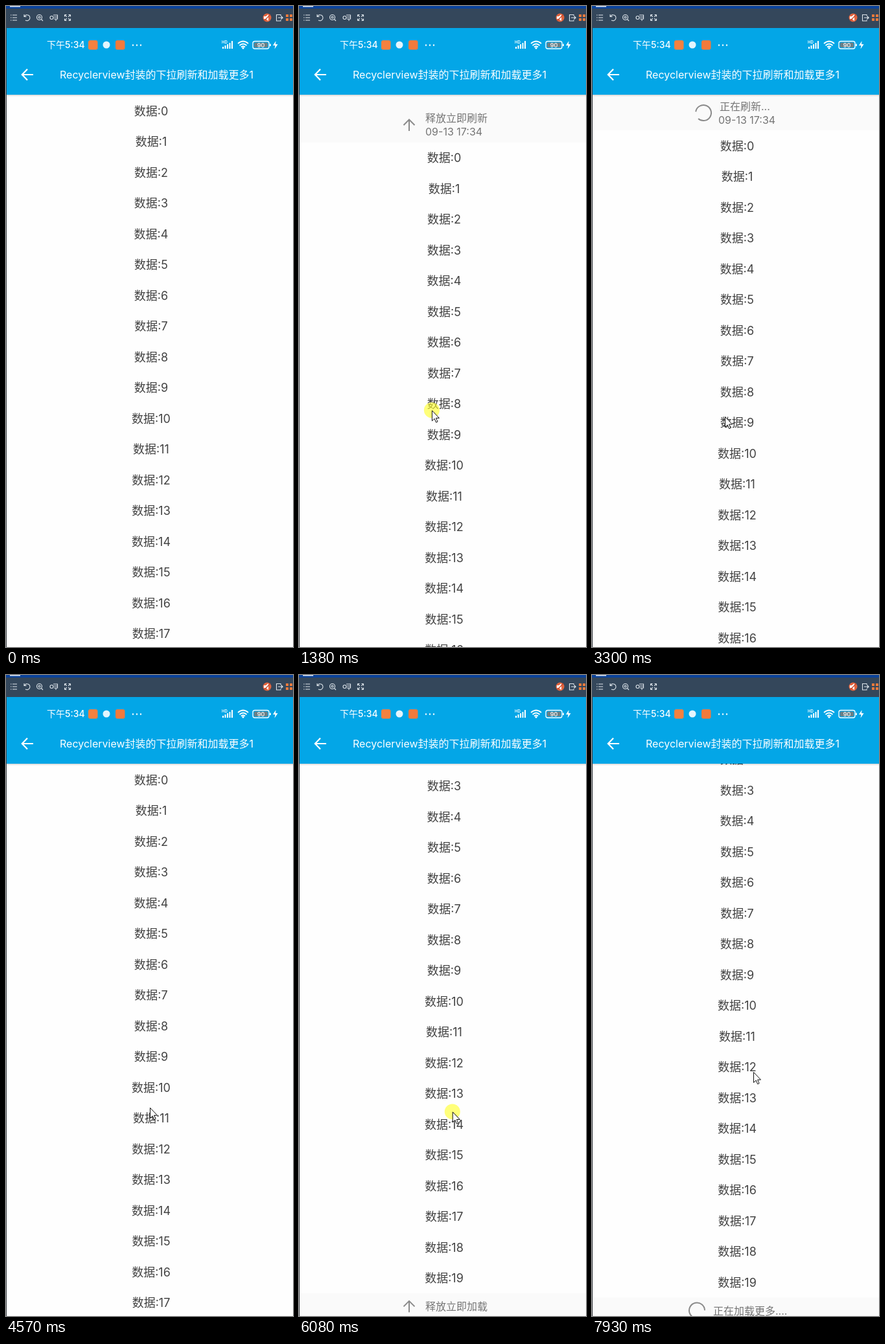
Recreate the animation shown at these times as an HTML page. Size 443 px wide and 990 px high, loop 8 s.

```html
<!DOCTYPE html>
<html lang="zh-CN">
<head>
<meta charset="utf-8">
<title>下拉刷新</title>
<style>
  html, body { margin: 0; width: 100%; height: 100%; overflow: hidden; background: #fafafa; }
  svg { display: block; width: 100vw; height: 100vh; }
  text { font-family: Inter, "Noto Sans CJK SC", "Noto Sans CJK", sans-serif; }
  .row { font-size: 18px; fill: #424242; text-anchor: middle; }
  .hint { font-size: 16px; fill: #757575; }
  .line { fill: none; stroke: #8a8a8a; stroke-width: 2; }
  .tool { fill: none; stroke: #dfe6ec; stroke-width: 1.1; }
  .bar { fill: none; stroke: #fff; }
</style>
</head>
<body>
<svg viewBox="0 0 443 990">
  <defs>
    <linearGradient id="shade" x2="0" y2="1">
      <stop stop-color="#000" stop-opacity=".16"/>
      <stop offset="1" stop-color="#000" stop-opacity="0"/>
    </linearGradient>
    <path id="up" class="line" d="M0 9.5V-8M-8.5 .5L0 -8L8.5 .5"/>
    <path id="ring" class="line" d="M2 11.8A12 12 0 1 1 11 4.8"/>
  </defs>

  <rect width="443" height="990" fill="#fafafa"/>

  <g id="list">
    <rect y="138" width="443" height="950" fill="#fefefe"/>
    <g id="pull">
      <use href="#up" transform="translate(170 111) rotate(180)"/>
      <text class="hint" x="195" y="107">下拉可以刷新</text>
    </g>
    <g id="release">
      <use href="#up" x="170" y="111"/>
      <text class="hint" x="195" y="107">释放立即刷新</text>
    </g>
    <g id="refresh">
      <g transform="translate(172 111)"><use class="spin" href="#ring"/></g>
      <text class="hint" x="197" y="107">正在刷新...</text>
    </g>
    <text id="done" class="hint" x="197" y="107">刷新完成</text>
    <text class="hint" x="195" y="128">09-13 17:34</text>
    <g id="more">
      <use href="#up" x="170" y="1108"/>
      <text class="hint" x="195" y="1114">释放立即加载</text>
    </g>
    <g id="loading">
      <g transform="translate(162 1108)"><use class="spin" href="#ring"/></g>
      <text class="hint" x="187" y="1114">正在加载更多....</text>
    </g>
  </g>

  <circle id="glow" cx="222" cy="1617" r="667" fill="#146e6e" fill-opacity=".13"/>

  <!-- Window toolbar -->
  <rect width="443" height="4" fill="#0b439b"/>
  <rect x="6" width="16" height="1.5" fill="#e4ebf5"/>
  <rect y="4" width="443" height="30" fill="#34475b"/>
  <g class="tool">
    <path stroke-dasharray="1.5 1.5 7 0" d="M7 14H17M7 18H17M7 22H17"/>
    <path d="M28 13V16.5H31.5M28.5 16A4.5 4.5 0 1 1 30 22"/>
    <circle cx="51.5" cy="17.5" r="4"/>
    <circle cx="51.5" cy="17.5" r="1.5"/>
    <path d="M54.5 20.5L57 23"/>
    <circle cx="70.5" cy="18" r="2.5"/>
    <path d="M73 14H79.5V20H74M77 20V23M74 17H79"/>
    <rect x="90.5" y="13.5" width="9" height="9" stroke-dasharray="3 3 3 0"/>
    <path d="M91 14L99 22M99 14L91 22" stroke-dasharray="4 3.3"/>
    <path d="M424 15V13.5H417.5V23H424V21.5M420 18H427L424.5 15.5M427 18L424.5 20.5"/>
  </g>
  <circle cx="403" cy="18" r="6.5" fill="#e2653f"/>
  <path d="M398 16H401L405 13V23L401 20H398Z" fill="#fff"/>
  <path d="M398.5 23L408 13" stroke="#c9472c" stroke-width="1.3"/>
  <path d="M432 15H443M432 21H443" stroke="#ee7b3c" stroke-width="4" stroke-dasharray="4 2"/>

  <!-- App bar -->
  <rect y="34" width="443" height="103" fill="#03a6e7"/>
  <rect y="137" width="443" height="3" fill="url(#shade)"/>
  <g fill="#fff">
    <text x="63" y="65" font-size="14" font-weight="500">下午5:34</text>
    <rect x="127" y="53" width="14.5" height="14.5" rx="3" fill="#f5813f"/>
    <circle cx="155" cy="60" r="5.5" fill="#e3f5fd"/>
    <rect x="169" y="53" width="14.5" height="14.5" rx="3" fill="#f27a3c"/>
    <path class="bar" d="M196 60.5H209" stroke-width="2.4" stroke-linecap="round" stroke-dasharray="0 6"/>
    <text x="333" y="58" font-size="6" font-weight="600">HD</text>
    <path d="M416.5 54L412 61H415.5L414.5 66.5L419.5 59H416Z"/>
    <circle cx="366" cy="65" r="1.6"/>
    <text x="83" y="112" font-size="16">Recyclerview封装的下拉刷新和加载更多1</text>
  </g>
  <path class="bar" stroke-width="2" d="M335 66V63M338.500 66V61M342 66V59M345.500 66V57M349 66V54"/>
  <path class="bar" stroke-width="1.7" d="M358 58Q366 51 374 58M360.5 61Q366 56 371.5 61M363 63.5Q366 61 369 63.5"/>
  <rect class="bar" x="381" y="54.5" width="25" height="11.5" rx="3" stroke-width="1.3"/>
  <rect x="383" y="56.5" width="21" height="7.5" rx="1.5" fill="#6a7f86"/>
  <rect x="407" y="58.5" width="1.8" height="3.5" fill="#fff"/>
  <text x="393.5" y="63.5" font-size="9" font-weight="500" fill="#fff" text-anchor="middle">90</text>
  <path class="bar" stroke-width="2.2" d="M42 106H25M33 97.5L24.8 106L33 114.5"/>
  <rect y="34" width="1" height="956" fill="#3b3f44"/>

  <g id="pointer">
    <circle id="press" r="12" fill="#ffff28" fill-opacity=".62"/>
    <path d="M.5 .5V16.5L4.2 13L6.7 18.8L9.1 17.7L6.6 12.1H11.5Z" fill="#fff" stroke="#111"/>
  </g>
</svg>

<script>
const LOOP = 8000;
const HEADER = 54;          // height of the header while refreshing
const SCROLL_END = 126.5;   // scroll position with the footer in view
const GRAB_Y = { top: 425, bottom: 729 };

const $ = id => document.getElementById(id);
const clamp = (v, lo, hi) => Math.min(hi, Math.max(lo, v));
const mix = (a, b, k) => a + (b - a) * k;
const ramp = (t, from, to) => clamp((t - from) / (to - from), 0, 1);
const easeOut = (t, from, to) => 1 - (1 - ramp(t, from, to)) ** 2;
const smooth = (t, from, to) => (1 - Math.cos(Math.PI * ramp(t, from, to))) / 2;

// The hand's strokes; each one slows down towards its end point.
const strokes = [
  { from: 70, to: 560, x: 203, y: GRAB_Y.top },
  { from: 760, to: 1550, x: 205, y: 634 },
  { from: 3300, to: 4570, x: 222, y: 668 },
  { from: 4570, to: 4640, x: 219, y: 683 },
  { from: 5180, to: 5600, x: 228, y: 655 },
  { from: 5600, to: 5950, x: 233, y: GRAB_Y.bottom },
  { from: 5950, to: 6640, x: 244, y: 569 },
  { from: 7650, to: 7900, x: 249, y: 613 }
];

function pointerAt(t) {
  let x = 392, y = 966;
  for (const stroke of strokes) {
    const k = easeOut(t, stroke.from, stroke.to);
    x = mix(x, stroke.x, k);
    y = mix(y, stroke.y, k);
  }
  return { x, y };
}

// Overscroll follows the finger with resistance after a short dead zone.
const stretch = distance => 0.455 * Math.max(0, distance - 40);

function headerHeight(t) {
  const pulled = stretch(pointerAt(clamp(t, 560, 2170)).y - GRAB_Y.top);
  return mix(pulled, HEADER, easeOut(t, 2170, 2450)) * (1 - smooth(t, 4290, 4550));
}

function scrollTop(t) {
  const pulled = stretch(GRAB_Y.bottom - pointerAt(clamp(t, 5950, 7650)).y);
  return SCROLL_END * easeOut(t, 5180, 5560) + pulled * (1 - easeOut(t, 7650, 7900));
}

function place(el, x, y) {
  el.setAttribute("transform", `translate(${x} ${y})`);
}

function show(id, visible) {
  $(id).setAttribute("visibility", visible ? "visible" : "hidden");
}

function draw(t) {
  const { x, y } = pointerAt(t);
  const header = headerHeight(t);
  const during = (from, to) => t >= from && t < to;

  place($("list"), 0, header - scrollTop(t));
  place($("pointer"), x, y);
  show("pointer", t >= 70);
  $("press").style.opacity =
    +(during(540, 2150) || during(4690, 5390) || during(5940, 7650));

  show("pull", t < 2235 && header <= HEADER);
  show("release", t < 2235 && header > HEADER);
  show("refresh", during(2235, 3850));
  show("done", t >= 3850);
  show("more", t < 7650);
  show("loading", t >= 7650);

  const flash = Math.sin(Math.PI * ramp(t, 5400, 5820));
  $("glow").style.opacity = flash;
  place($("glow"), 0, 45 * (1 - flash));

  for (const ring of document.querySelectorAll(".spin"))
    ring.setAttribute("transform", `rotate(${t * 0.36})`);
}

for (let i = 0; i < 20; i++) {
  const row = document.createElementNS("http://www.w3.org/2000/svg", "text");
  row.setAttribute("class", "row");
  row.setAttribute("x", 224);
  row.setAttribute("y", 168.7 + 47.5 * i);
  row.textContent = "数据:" + i;
  $("list").append(row);
}

let start;
function tick(now) {
  start ??= now;
  draw((now - start) % LOOP);
  requestAnimationFrame(tick);
}
draw(0);
requestAnimationFrame(tick);
</script>
</body>
</html>
```
